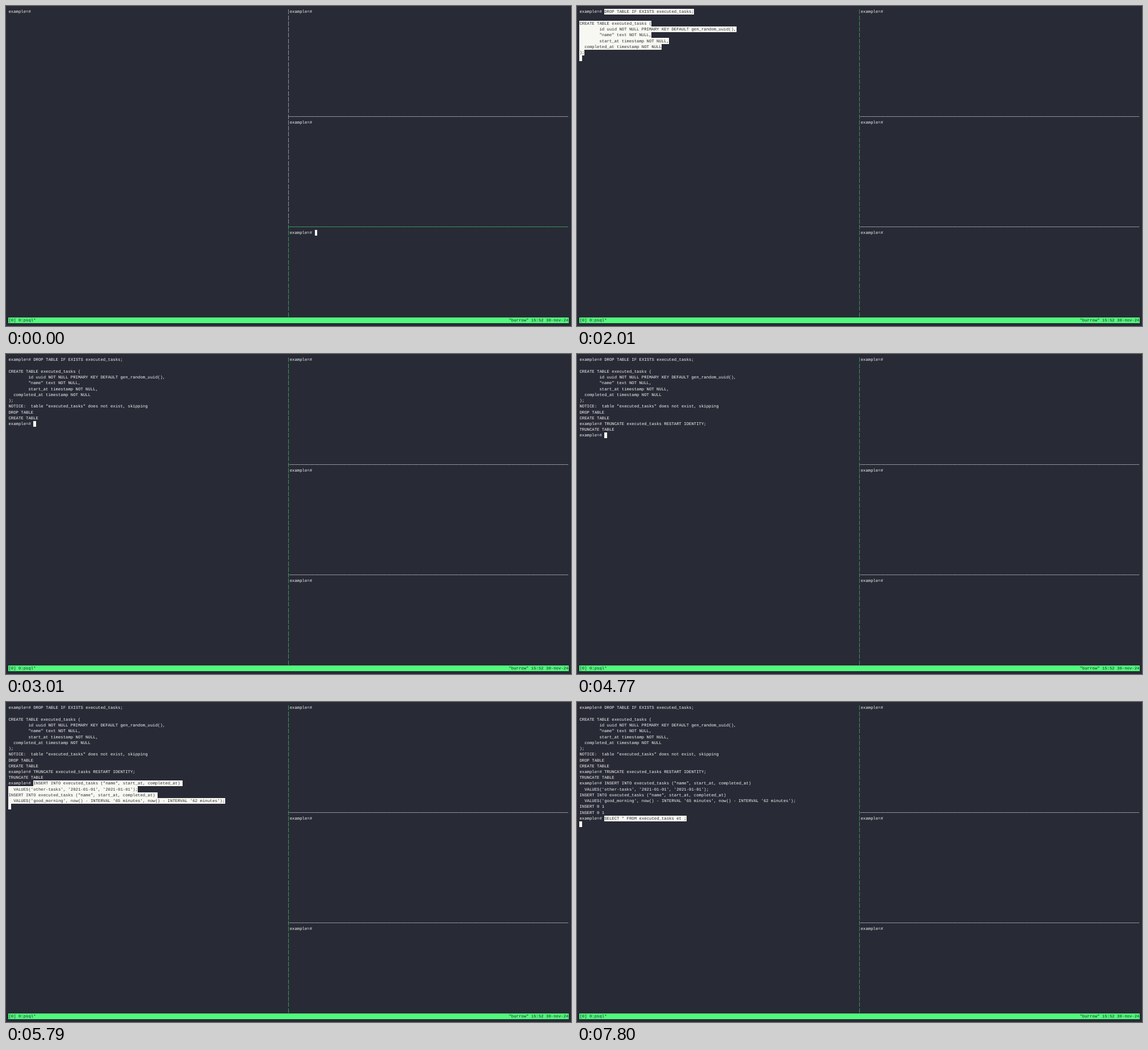
An HTML page for the animation above (8000 ms loop, 995 by 563 pixels).

```html
<!DOCTYPE html>
<html lang="en">
<head>
<meta charset="utf-8">
<title>Terminal session</title>
<style>
  html, body { margin: 0; width: 100%; height: 100%; overflow: hidden; background: #282a36; }
  svg { display: block; width: 995px; height: 563px; }
  text {
    font-family: "Liberation Mono", "DejaVu Sans Mono", monospace;
    white-space: pre;
    text-rendering: geometricPrecision;
  }
  rect { shape-rendering: crispEdges; }
</style>
</head>
<body>
<svg id="terminal" viewBox="0 0 995 563"></svg>
<script>
const LOOP = 8000;
const BG = '#282a36', FG = '#f8f8f2', GREEN = '#50fa7b', BLACK = '#21222c';
const COLS = 225, SPLIT = 112;
const CELL = 995 / 227, ROW = 563 / 55;
const FONT = CELL / 0.6001;
const PROMPT = 'example=# ';
const stage = document.getElementById('terminal');
const timed = [];

const colX = col => (col + 1) * CELL;
const rowY = row => (row + 0.5) * ROW;

function add(tag, attrs, from, to) {
  const el = document.createElementNS('http://www.w3.org/2000/svg', tag);
  for (const key in attrs) el.setAttribute(key, attrs[key]);
  stage.append(el);
  if (from > 0 || to < LOOP) timed.push({ el, from, to });
  return el;
}

function write(row, col, str, from = 0, to = LOOP, fill = FG) {
  const attrs = { x: colX(col), y: rowY(row) + FONT, 'font-size': FONT, fill };
  add('text', attrs, from, to).textContent = str;
}

function block(row, col, count, from = 0, to = LOOP, fill = FG) {
  add('rect', { x: colX(col), y: rowY(row), width: count * CELL, height: ROW, fill }, from, to);
}

// Pasted lines stay inverted until the command runs.
function paste(row, lines, from, run) {
  lines.forEach((str, i) => {
    if (!str) return;
    const col = i ? 0 : PROMPT.length;
    block(row + i, col, str.length, from, run);
    write(row + i, col, str, from, run, BG);
    write(row + i, col, str, run);
  });
  block(row + lines.length, 0, 1, from, run);
}

function output(row, lines, from) {
  lines.forEach((str, i) => write(row + i, 0, str, from));
}

function showPrompt(row, from, to) {
  write(row, 0, PROMPT, from);
  block(row, PROMPT.length, 1, from, to);
}

// Pane borders
const FOCUS = 1010;
for (let row = 0; row < 53; row++) {
  const glyph = row === 18 || row === 37 ? '├' : '│';
  if (row < 37) write(row, SPLIT, glyph, 0, FOCUS);
  write(row, SPLIT, glyph, row < 37 ? FOCUS : 0, LOOP, GREEN);
}
const border = '─'.repeat(SPLIT);
write(18, SPLIT + 1, border);
write(37, SPLIT + 1, border, 0, FOCUS, GREEN);
write(37, SPLIT + 1, border, FOCUS);

// Right panes
for (const row of [0, 19, 38]) write(row, SPLIT + 1, PROMPT);
block(38, SPLIT + 1 + PROMPT.length, 1, 0, FOCUS);

// Status line
const hostInfo = '"burrow" 15:52 30-nov-24';
block(53, 0, COLS, 0, LOOP, GREEN);
write(53, 0, '[0] 0:psql*', 0, LOOP, BLACK);
write(53, COLS - hostInfo.length, hostInfo, 0, LOOP, BLACK);

// Left pane session
write(0, 0, PROMPT);
block(0, PROMPT.length, 1, FOCUS, 2010);
paste(0, [
  'DROP TABLE IF EXISTS executed_tasks;',
  '',
  'CREATE TABLE executed_tasks (',
  '        id uuid NOT NULL PRIMARY KEY DEFAULT gen_random_uuid(),',
  '        "name" text NOT NULL,',
  '        start_at timestamp NOT NULL,',
  '  completed_at timestamp NOT NULL',
  ');'
], 2010, 3010);
output(8, [
  'NOTICE:  table "executed_tasks" does not exist, skipping',
  'DROP TABLE',
  'CREATE TABLE'
], 3010);
showPrompt(11, 3010, 4030);

paste(11, ['TRUNCATE executed_tasks RESTART IDENTITY;'], 4030, 4770);
output(12, ['TRUNCATE TABLE'], 4770);
showPrompt(13, 4770, 5790);

const insertLine = 'INSERT INTO executed_tasks ("name", start_at, completed_at) ';
paste(13, [
  insertLine,
  "  VALUES('other-tasks', '2021-01-01', '2021-01-01');",
  insertLine,
  "  VALUES('good_morning', now() - INTERVAL '65 minutes', now() - INTERVAL '62 minutes');"
], 5790, 6790);
output(17, ['INSERT 0 1', 'INSERT 0 1'], 6790);
showPrompt(19, 6790, 7800);

paste(19, ['SELECT * FROM executed_tasks et ;'], 7800, LOOP);

const startTime = performance.now();
function draw() {
  const t = (performance.now() - startTime) % LOOP;
  for (const { el, from, to } of timed) {
    el.style.visibility = t >= from && t < to ? 'visible' : 'hidden';
  }
  requestAnimationFrame(draw);
}
draw();
</script>
</body>
</html>
```
